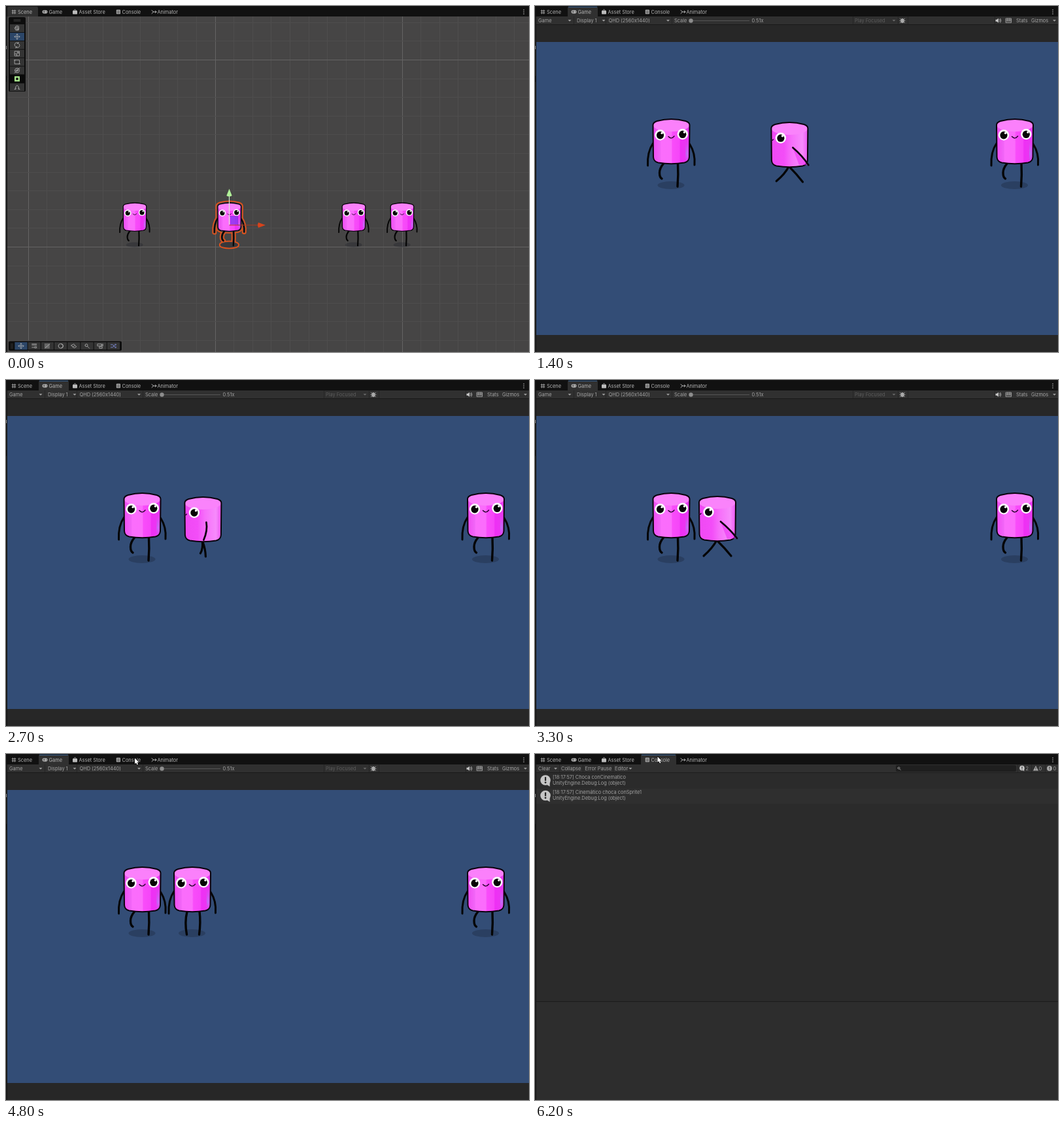
Write an HTML page with a canvas that moves like this. It is 800 px wide and 529 px high and loops after 7000 ms.

```html
<!DOCTYPE html>
<html lang="es">
<head>
<meta charset="utf-8">
<style>
html, body { margin: 0; width: 100%; height: 100%; overflow: hidden; background: #111; }
canvas { display: block; }
</style>
</head>
<body>
<canvas id="stage" width="800" height="529"></canvas>
<script>
const c = document.getElementById('stage').getContext('2d');
const LOOP = 7000, STEP = 100;
const ICON = '#a6a6a6', TEXT = '#b4b4b4';

function rect(x, y, w, h, fill) { c.fillStyle = fill; c.fillRect(x, y, w, h); }
function round(x, y, w, h, r, fill) {
  c.fillStyle = fill; c.beginPath(); c.roundRect(x, y, w, h, r); c.fill();
}
function oval(x, y, rx, ry, fill) {
  c.fillStyle = fill; c.beginPath(); c.ellipse(x, y, rx, ry, 0, 0, 7); c.fill();
}
function shape(d, fill) { c.fillStyle = fill; c.fill(new Path2D(d)); }
function line(d, color, width) {
  c.strokeStyle = color; c.lineWidth = width; c.stroke(new Path2D(d));
}
function text(s, x, y, color = TEXT, size = 7.4, weight = 400) {
  c.font = `${weight} ${size}px Inter, sans-serif`;
  c.fillStyle = color;
  c.fillText(s, x, y + 2.7);
}
function at(x, y, scale, draw) {
  c.save(); c.translate(x, y); c.scale(scale, scale); draw(); c.restore();
}
const caret = x => shape(`M${x - 2.5} 21h5l-2.5 2.8z`, '#9a9a9a');

// ---- Character: origin is the middle of the top edge ----
const BODY = 'M-28 9Q-28 5-22 3Q0-3 22 3Q28 5 28 9L27.5 58Q27 65 20 66.5Q0 70-20 66.5Q-27 65-27.5 58Z';
const ARMS = 'M-28 37Q-37 50-36 71M28 38Q37 52 35.5 70';
const BENT = 'M-12 68Q-18 75-18 82Q-18 89-14.5 91M10 68Q11 85 9.5 103';
const STRAIGHT = 'M-8 68Q-12 84-8.5 103M11 68Q13 84 10.5 103';

function body(side) {
  c.save();
  c.clip(new Path2D(BODY));
  const g = c.createLinearGradient(-28, 0, 28, 0);
  const stops = side
    ? [[0, '#ef49f3'], [.35, '#f34df8'], [.55, '#f66efa'], [.85, '#f78bfc'], [1, '#ec55f3']]
    : [[0, '#f04bf2'], [.2, '#f166f7'], [.22, '#fb6dfc'], [.5, '#fb6cfc'], [.53, '#f94cfa'],
       [.72, '#f546f8'], [.75, '#ef2ff5'], [1, '#e63bf0']];
  stops.forEach(s => g.addColorStop(...s));
  rect(-30, -3, 60, 75, g);
  oval(0, 9, 28, 10, side ? '#fa83fb' : '#fb80fb');
  const blue = c.createLinearGradient(0, 35, 0, 65);
  blue.addColorStop(0, '#b978f500');
  blue.addColorStop(.6, '#b978f5cc');
  blue.addColorStop(1, '#b978f500');
  if (!side) rect(22, 35, 4, 30, blue);
  c.restore();
  line(BODY, '#0b030d', 2);
}
function eye(x, y) {
  oval(x, y, 8.2, 8.2, '#fff');
  oval(x, y + .3, 5.6, 5.8, '#050505');
  oval(x + 2.6, y - 3, 1.7, 1.7, '#fff');
}
function stand(x, y, legs, scale = 1) {
  at(x, y, scale, () => {
    oval(-.5, 101, 20.5, 6, 'rgba(16,20,32,.25)');
    line(legs, '#050505', 3.4);
    line(ARMS, '#050505', 3);
    body(false);
    eye(-17, 24.3);
    eye(17.3, 23);
    line('M-4.5 26.5Q0 31.5 4.5 26', '#2a0630', 1.5);
  });
}
function run(x, phase) {
  const k = Math.cos(phase), foot = 25 * k + 4, lift = Math.sin(phase) * 5;
  at(x, 179 + k, 1, () => {
    const leg = (fx, fy) => `M-1 67Q${fx * .45 + 2} 79 ${fx} ${fy}`;
    line(leg(-foot, 91 - Math.max(0, lift)), '#050505', 3.2);
    line(leg(foot, 91 + Math.min(0, lift)), '#050505', 3.2);
    body(true);
    eye(-13.5, 23.7);
    line('M-28 27Q-26 28-25 26', '#2a0630', 1.5);
    const hx = 1 - 29 * k, hy = 60.5 - 3.5 * k + 5 * Math.abs(Math.sin(phase));
    shape(`M5 39L${hx} ${hy}L${hx * .5} 65Z`, 'rgba(235,40,242,.55)');
    line(`M5 38.5Q${hx * .3 + 7 - 4 * k} 51 ${hx} ${hy}`, '#0b030d', 2.7);
  });
}

// ---- Window frame ----
function tabs(active, playing) {
  rect(0, 0, 800, 529, '#111');
  const [x, w] = [[2, 47], [50, 46], [162, 54]][active];
  round(x, 1, w, 17, [2, 2, 0, 0], '#303030');
  if (playing) rect(x + 1, 1, w - 2, 1, '#355f8e');
  line('M10.5 6v6M13.5 6v6M9 7.5h6M9 10.5h6', ICON, .9);
  round(55.5, 6.4, 8, 5, 2.3, '#bbb');
  line('M57 8.9h2.4M58.2 7.7v2.4', '#222', .7);
  oval(61.6, 8.9, .7, .7, '#222');
  round(102, 7, 7, 5.5, .8, '#bbb');
  line('M103.7 8V6.7Q105.5 4 107.3 6.7V8', '#bbb', .9);
  round(168.8, 5.8, 6.2, 6.4, .8, '#bbb');
  line('M170 7.6h4M170 9.2h4M170 10.8h4', '#222', .7);
  line('M223 6.5L225.5 9L223 11.5M225.5 9H230M228.3 7.5L230 9L228.3 10.5', '#bbb', 1);
  [['Scene', 18], ['Game', 65.5], ['Asset Store', 111.5], ['Console', 177.5], ['Animator', 231.5]]
    .forEach(([s, x]) => text(s, x, 9));
  [6, 9, 12].forEach(y => oval(792, y, .8, .8, '#bbb'));
}
function edge() {
  rect(0, 16, 2, 513, '#181818');
  rect(0, 61, 1, 5, '#888');
  rect(0, 107, 1, 9, '#080808');
}

// ---- Scene view ----
const MOVE = 'M-4 0H4M0-4V4M-2.8-1.2L-4 0L-2.8 1.2M2.8-1.2L4 0L2.8 1.2M-1.2-2.8L0-4L1.2-2.8M-1.2 2.8L0 4L1.2 2.8';
const SIDE_ICONS = [
  'M-2.5 0V-2.5M-1-.5V-4M.8-.5V-4M2.4 0V-3M-4-.8L-2 3H2L2.7 0M-1 1H2M-1 2H2',
  MOVE,
  'M-3.3 1.5A3.5 3.5 0 0 1 2-3M3.3-1.5A3.5 3.5 0 0 1-2 3M2-4.5V-2.5H0M-2 4.5V2.5H0',
  'M-3.5-3.5H3.5V3.5H-3.5ZM-3.5.5H-.5V3.5M0 0L2-2M0-2H2V0',
  'M-3.5-3H3.5V3H-3.5ZM-4.5-3H-2.5M2.5 3H4.5',
  'M-3.5 0A3.5 3.5 0 1 1 3.5 0A3.5 3.5 0 1 1-3.5 0M-4 4L4-4M-2 0H2M0-2V2',
  '',
  'M-4 3H-2V1M2 1V3H4M-3 2Q-2-3 0-3Q2-3 3 2'
];
const BASE_ICONS = [
  MOVE,
  'M-3.5-3H3.5M-3.5-1.5H3.5M-3.5 2H-.5M1 1H3.5V3H1Z',
  'M-3.5-3.5V3.5M-1.5-3.5V3.5M.5-3.5V3.5M2.5-3.5V3.5M-3.5 3L3.5-3',
  'M-3.5 0A3.5 3.5 0 1 1 3.5 0A3.5 3.5 0 1 1-3.5 0M1-3A3 3 0 0 1 1 3',
  'M-4-1L0-3L2-1L-1 1ZM-2 1.5L1 3L4 1L2-.5',
  'M-3-1A2 2 0 1 1 1-1A2 2 0 1 1-3-1M.5.5L3.5 3.5',
  'M-4-3H2V0H-4ZM2-2L4-3V0L2-1M-1 1H3V3.5H-1Z',
  'M-4-2H-1L2 2H4M-4 2H-1L2-2H4M3-3L4-2L3-1M3 1L4 2L3 3'
];
function sceneTools() {
  round(4, 17, 26, 114, 2, '#0d0d0d');
  line('M12 21h10M12 23h10', '#555', .7);
  SIDE_ICONS.forEach((d, i) => {
    const y = 34 + i * 12.9;
    rect(6, y - 6, 22, 12, i == 1 ? '#2c4668' : i == 6 ? '#090909' : '#343434');
    if (i == 6) {
      rect(13, y - 4, 8, 8, '#a9e88e');
      rect(15.3, y - 1.7, 3.4, 3.4, '#111');
    } else at(17, y, 1, () => line(d, '#b5b5b5', .8));
  });
  round(4, 512.5, 173, 14.5, 2, '#0d0d0d');
  line('M8 516v8M10 516v8', '#444', .7);
  BASE_ICONS.forEach((d, i) => {
    const x = 23 + i * 20.2;
    rect(x - 9.6, 514, 19.2, 11.5, i ? '#343434' : '#2c4668');
    at(x, 519.8, 1, () => line(d, i == 7 ? '#8290e0' : '#b5b5b5', .8));
  });
}
function selection(x, y, scale) {
  at(x, y, scale, () => {
    const ring = new Path2D();
    ring.ellipse(-.5, 101, 20.5, 6, 0, 0, 7);
    for (const [color, extra] of [['#e2521b', 8], ['#464545', 2.5]]) {
      c.strokeStyle = c.fillStyle = color;
      for (const d of [BODY, ARMS, BENT]) line(d, color, 3 + extra);
      c.lineWidth = extra;
      c.stroke(ring);
      c.fill(ring);
    }
  });
}
function scene() {
  tabs(0, false);
  rect(2, 16, 798, 513, '#464545');
  for (let i = 0; i < 27; i++) {
    const x = 33.5 + i * 28.6;
    rect(Math.round(x), 16, 1, 513, i % 10 ? '#4e4d4d' : '#646363');
  }
  for (let i = -2; i < 16; i++) {
    const y = 82 + i * 28.6;
    rect(2, Math.round(y), 798, 1, i % 10 ? '#4e4d4d' : '#646363');
  }
  edge();
  const s = .635;
  selection(341.7, 301, s);
  [197, 341.7, 532, 606].forEach(x => stand(x, 301, BENT, s));
  rect(343, 322, 11, 12, 'rgba(130,55,240,.75)');
  line('M342.5 321.5H354.5V334.5', '#7a35d8', .8);
  line('M341.5 334V290', '#d9f0d2', 1.1);
  shape('M341.5 279.5L345.7 290Q341.5 292.5 337.3 290Z', '#b1f299');
  line('M342 335H386', '#a63a22', 1);
  shape('M397 335L386 339Q384 335 386 331Z', '#d6431c');
  sceneTools();
}

// ---- Game view ----
function game(t) {
  tabs(1, true);
  rect(2, 16, 798, 12, '#303030');
  rect(2, 28, 798, 501, '#272727');
  rect(2, 28, 798, 1, '#191919');
  rect(2, 55, 798, 448, '#334d76');
  edge();
  [59, 108, 209, 486, 555, 570, 703].forEach(x => rect(x, 16, 1, 12, '#262626'));
  [['Game', 5], ['Display 1', 64], ['QHD (2560x1440)', 112.5], ['Scale', 213], ['0.51x', 331.5],
    ['Stats', 736], ['Gizmos', 759]].forEach(([s, x]) => text(s, x, 22, '#a4a4a4'));
  text('Play Focused', 489, 22, '#5c5c5c');
  [53, 105, 203.5, 794.5].forEach(caret);
  shape('M546.5 21h5l-2.5 2.8z', '#666');
  rect(238, 22, 90, 1, '#555');
  oval(238.5, 22.5, 3.2, 3.2, '#8d8d8d');
  line('M558.5 19.5L565.5 25.5M558.5 25.5L565.5 19.5M558 22.5H566', '#aaa', .9);
  oval(562, 22.5, 2.6, 3.6, '#aaa');
  shape('M704.5 20.8h2l2.5-2v7l-2.5-2h-2z', '#c4c4c4');
  line('M710.5 20.5Q712 22.3 710.5 24M711.8 19.3Q714 22.3 711.8 25.2', '#c4c4c4', .8);
  line('M720.5 19h8v6.5h-8ZM720.5 21h8M720.5 23h8M723 19v4M726 19v4', '#b0b0b0', .8);

  stand(208.5, 173, BENT);
  stand(734, 173, BENT);
  // walks left at a steady speed until the neighbour blocks it
  const x = Math.max(285, 436 - Math.max(0, t - 800) * 88 / 1300);
  if (t > 800 && t < 3800) run(x - 6, (t - 2100) / 480 * 2 * Math.PI);
  else stand(x, 173, STRAIGHT);
  if (t >= 4600) {
    const k = (t - 4600) / 300;
    cursor(215 - 27 * k, 1 + 8 * k);
  }
}

// ---- Console view ----
function bubble(x, y, r, color = '#c5c5c5') {
  oval(x, y, r, r, color);
  shape(`M${x} ${y + r * .7}L${x + r * .85} ${y + r * 1.25}V${y}Z`, color);
  rect(x - r * .14, y - r * .62, r * .28, r * .75, '#252525');
  oval(x, y + r * .46, r * .18, r * .18, '#252525');
}
function consoleView(t) {
  tabs(2, true);
  rect(2, 16, 798, 12, '#303030');
  rect(2, 28, 798, 501, '#2b2b2b');
  rect(2, 28, 798, 1, '#1e1e1e');
  rect(2, 53, 798, 23, '#2f2f2f');
  rect(2, 378, 798, 1, '#1c1c1c');
  rect(2, 379, 798, 150, '#2d2d2d');
  edge();
  [['Clear', 5], ['Collapse', 40], ['Error Pause', 76.5], ['Editor', 122]]
    .forEach(([s, x]) => text(s, x, 22, '#a0a0a0'));
  caret(31.5);
  caret(146);
  [37, 73, 119, 738, 759, 780].forEach(x => rect(x, 16, 1, 12, '#262626'));
  round(552, 17, 184, 10, 2, '#1f1f1f');
  line('M555 21.5a1.5 1.5 0 1 1 3 0a1.5 1.5 0 1 1-3 0M557.5 22.7L559.3 24.5', '#aaa', .8);
  bubble(745, 21.5, 3.8);
  shape('M766 17.8L770 25.5H762Z', '#aaa');
  rect(765.6, 20.4, .8, 2.6, '#252525');
  rect(765.6, 23.7, .8, .8, '#252525');
  oval(787, 22, 3.9, 3.9, '#aaa');
  rect(786.5, 19.5, 1, 3, '#252525');
  rect(786.5, 23.4, 1, 1, '#252525');
  [['2', 750.5], ['0', 770.5], ['0', 792.5]].forEach(([s, x]) => text(s, x, 22, '#a0a0a0'));
  ['Choca conCinematico', 'Cinemático choca conSprite1'].forEach((s, i) => {
    const y = 35 + i * 23.5;
    bubble(16, y + 5, 7.8);
    text('[18:17:57] ' + s, 27, y, '#a0a0a0');
    text('UnityEngine.Debug:Log (object)', 27, y + 9, '#a0a0a0');
  });
  cursor(187.5, t < 5400 ? 9 : 4);
}

function cursor(x, y) {
  at(x, y, 1, () => {
    const d = 'M0 0V8.8L2 7L3.4 10.2L5 9.5L3.6 6.4H6.3Z';
    line(d, '#000', 1.3);
    shape(d, '#fff');
  });
}

c.lineCap = c.lineJoin = 'round';
const start = performance.now();
function frame(now) {
  const t = Math.floor(Math.max(0, now - start) % LOOP / STEP) * STEP;
  if (t < 100) scene();
  else if (t < 4900) game(t);
  else consoleView(t);
  requestAnimationFrame(frame);
}
frame(start);
</script>
</body>
</html>
```
